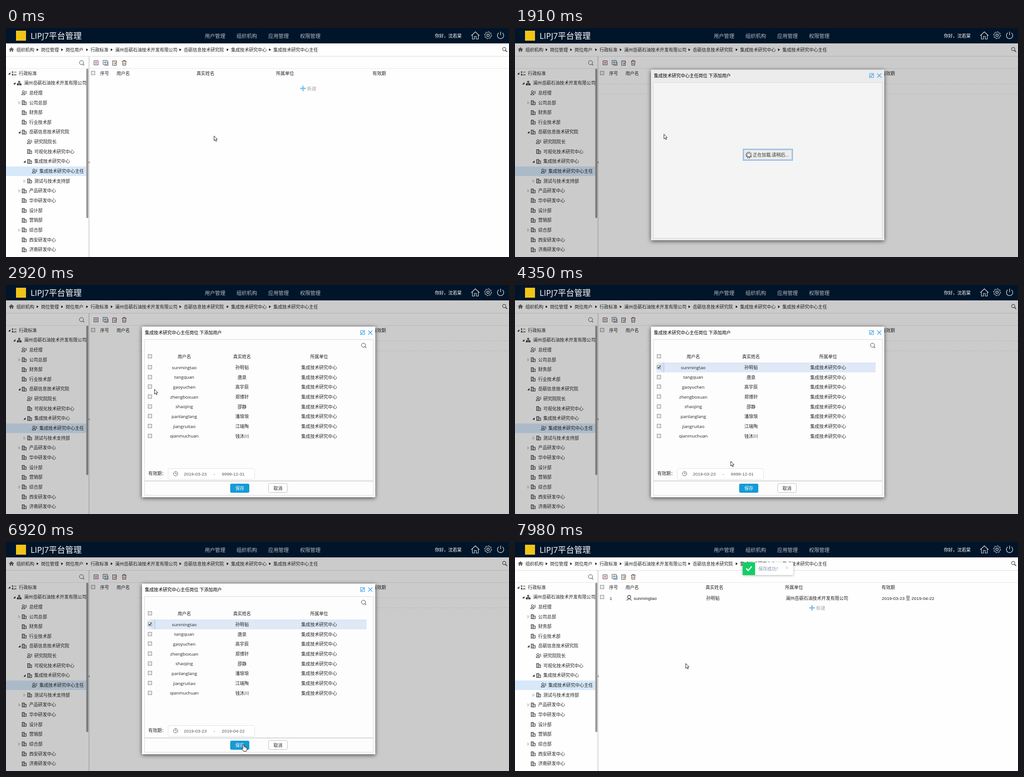
These frames come from a looping animation (1106 by 506 pixels, 8000 ms). An HTML page with a canvas:

```html
<!DOCTYPE html>
<html lang="zh-CN">
<head>
<meta charset="utf-8">
<title>平台管理</title>
<style>
html, body { margin: 0; width: 100%; height: 100%; overflow: hidden; background: #fff; }
canvas { display: block; }
</style>
</head>
<body>
<canvas id="stage" width="1106" height="506"></canvas>
<script>
const g = document.getElementById('stage').getContext('2d');
const LOOP = 8000, INK = '#222', BLUE = '#409eff';
const UI = '"Open Sans","Noto Sans CJK SC","Noto Sans CJK",sans-serif';
const ARIAL = '"Liberation Sans","Noto Sans CJK SC","Noto Sans CJK",sans-serif';

const COMPANY = '澜州岳砺石油技术开发有限公司';
const INSTITUTE = '岳砺信息技术研究院';
const CENTER = '集成技术研究中心';
const USERS = [
  ['sunmingtao', '孙明韬'], ['tangquan', '唐泉'], ['gaoyuchen', '高宇辰'],
  ['zhengboxuan', '郑博轩'], ['shaojing', '邵静'], ['panlanglang', '潘琅琅'],
  ['jiangruitao', '江瑞陶'], ['qianmuchuan', '钱沐川']
];

// depth, arrow (o open, c closed), icon, label
const TREE = [
  [0, 'o', 'list', '行政标准'], [1, 'o', 'org', COMPANY], [2, '', 'user', '总经理'],
  [2, 'c', 'dept', '公司总部'], [2, '', 'dept', '财务部'], [2, '', 'dept', '行业技术部'],
  [2, 'o', 'dept', INSTITUTE], [3, '', 'user', '研究院院长'],
  [3, '', 'dept', '可视化技术研究中心'], [3, 'o', 'dept', CENTER],
  [4, '', 'user', CENTER + '主任'], [3, 'c', 'dept', '测试与技术支持部'],
  [2, 'c', 'dept', '产品研发中心'], [2, '', 'dept', '华中研发中心'], [2, '', 'dept', '设计部'],
  [2, '', 'dept', '营销部'], [2, 'c', 'dept', '综合部'], [2, '', 'dept', '西安研发中心'],
  [2, '', 'dept', '济南研发中心']
];
const CRUMBS = [[23, '组织机构'], [77, '岗位管理'], [131, '岗位用户'], [186, '行政标准'],
  [240, COMPANY], [391, INSTITUTE], [495, CENTER], [588, CENTER + '主任']];

// time, x, y of the pointer
const PATH = [
  [60, 457, 238], [200, 405, 222], [400, 310, 196], [560, 288, 190], [1300, 288, 190],
  [1360, 295, 198], [1540, 327, 234], [2880, 327, 234], [3250, 318, 196], [3450, 316, 183],
  [3600, 318, 183], [3690, 331, 186], [3960, 331, 186], [4350, 474, 389], [4770, 499, 430],
  [4800, 499, 430], [5070, 497, 418], [5310, 497, 418], [5430, 432, 376], [5700, 388, 255],
  [6030, 376, 225], [6100, 376, 225], [6400, 475, 385], [6680, 521, 447], [7230, 521, 447],
  [7500, 460, 370], [7980, 375, 268]
];

function rect(x, y, w, h, c) { g.fillStyle = c; g.fillRect(x, y, w, h); }
function box(x, y, w, h, c) { g.strokeStyle = c; g.lineWidth = 1; g.strokeRect(x + .5, y + .5, w - 1, h - 1); }
function round(x, y, w, h, r, fill, stroke) {
  g.beginPath(); g.roundRect(x, y, w, h, r);
  if (fill) { g.fillStyle = fill; g.fill(); }
  if (stroke) { g.strokeStyle = stroke; g.lineWidth = 1; g.stroke(); }
}
function trace(pts) {
  g.beginPath();
  for (let i = 0; i < pts.length; i += 2) g.lineTo(pts[i], pts[i + 1]);
}
function line(pts, c, w = 1) { trace(pts); g.strokeStyle = c; g.lineWidth = w; g.stroke(); }
function poly(pts, fill, stroke) {
  trace(pts); g.closePath();
  if (fill) { g.fillStyle = fill; g.fill(); }
  if (stroke) { g.strokeStyle = stroke; g.lineWidth = 1; g.stroke(); }
}
function ring(x, y, r, c, w = 1, a = 0, b = Math.PI * 2) {
  g.beginPath(); g.arc(x, y, r, a, b); g.strokeStyle = c; g.lineWidth = w; g.stroke();
}
function text(s, x, y, c = INK, size = 9.8, align = 'left', font = UI, weight = 400) {
  g.font = `${weight} ${size}px ${font}`;
  g.textAlign = align; g.fillStyle = c;
  g.fillText(s, x, y + size * .37);
}
function shadowed(blur, dx, dy, c, draw) {
  g.save();
  g.shadowBlur = blur; g.shadowOffsetX = dx; g.shadowOffsetY = dy; g.shadowColor = c;
  draw();
  g.restore();
}
function at(x, y, draw) { g.save(); g.translate(x, y); draw(); g.restore(); }

function checkbox(x, y, on) {
  rect(x, y, 9, 9, '#e9e9e9'); box(x, y, 9, 9, '#8d8d8d');
  if (on) line([x + 2, y + 4.5, x + 4, y + 6.7, x + 7.2, y + 2], '#222', 1.4);
}
function lens(x, y, r, c = '#444', w = 1) {
  ring(x, y, r, c, w);
  line([x + r * .7, y + r * .7, x + r * 1.35, y + r * 1.35], c, w + .2);
}
function plusBox(x, y, c, p = c) {
  box(x - 5, y - 5, 10, 10, c);
  line([x - 3, y, x + 3, y], p); line([x, y - 3, x, y + 3], p);
}
function stackBox(x, y, c) {
  plusBox(x - 1, y - 1, c);
  line([x + 5.5, y - 3, x + 5.5, y + 5.5, x - 3, y + 5.5], c);
}
function trash(x, y, c) {
  line([x - 5, y - 3.5, x + 5, y - 3.5], c);
  line([x - 2, y - 4, x - 2, y - 5.5, x + 2, y - 5.5, x + 2, y - 4], c);
  line([x - 3.8, y - 3, x - 3.3, y + 5.3, x + 3.3, y + 5.3, x + 3.8, y - 3], c);
  line([x - 1.3, y - 1, x - 1.3, y + 3.5], c, .8); line([x + 1.3, y - 1, x + 1.3, y + 3.5], c, .8);
}

const ICONS = {
  list() {
    for (const y of [-3, 2]) {
      box(-5, y - 1, 3, 3, '#333');
      line([0, y + .5, 5, y + .5], '#333');
    }
    line([-5, 4.5, 5, 4.5], '#333', .7);
  },
  org() {
    box(-2, -5, 4, 3, INK); line([0, -2, 0, 0], INK);
    line([-3.5, 2, -3.5, 0, 3.5, 0, 3.5, 2], INK); line([0, 0, 0, 2], INK);
    for (const x of [-5, -1.5, 2]) box(x, 1.5, 3, 3, INK);
  },
  dept() {
    box(-5, -5, 6, 10, INK);
    line([1, -1.5, 4.5, -1.5, 4.5, 4.5, -5, 4.5], INK);
    for (const y of [-2.5, 0, 2.5]) line([-3.3, y, -.8, y], INK);
    line([2, 1, 3.4, 1], INK, .8);
  },
  user() {
    ring(-1.8, -2, 2.4, INK);
    ring(-1.8, 4.6, 3.7, INK, 1, Math.PI, 0);
    line([-5.5, 4.5, 2, 4.5], INK);
    for (const y of [-3, -.8, 1.4]) line([2.2, y, 5.5, y], INK, .9);
  }
};

function header() {
  rect(0, 0, 1106, 34, '#001529');
  rect(22, 6, 22, 22, '#f0c419');
  text('LIPJ7平台管理', 54, 17, '#fff', 18);
  ['用户管理', '组织机构', '应用管理', '权限管理'].forEach((s, i) =>
    text(s, 437 + i * 69.8, 17.5, '#b5bcc4', 11.3));
  text('你好，沈若棠', 943, 17.5, '#fff');
  const c = '#d8dce0';
  line([1023, 17, 1032, 8.5, 1041, 17], c, 1.3);
  line([1025.5, 15, 1025.5, 24.5, 1030, 24.5, 1030, 18.5, 1034, 18.5, 1034, 24.5, 1038.5, 24.5, 1038.5, 15], c, 1.2);
  ring(1060, 16, 2.7, c, 1.2);
  const gear = [];
  for (let i = 0; i < 32; i++) {
    const a = (i + .5) * Math.PI / 16, r = i % 4 < 2 ? 8 : 6;
    gear.push(1060 + r * Math.cos(a), 16 + r * Math.sin(a));
  }
  poly(gear, null, c);
  ring(1087.5, 16.5, 7, c, 1.3, -Math.PI * .3, Math.PI * 1.3);
  line([1087.5, 8, 1087.5, 16], c, 1.3);
}

function page(t, modal, saved) {
  rect(0, 34, 1106, 472, '#fefefe');
  rect(0, 62, 1106, 1, '#dcdcdc');
  rect(0, 89, 1106, 1, '#e6e6e6');
  line([7, 48, 12, 43.5, 17, 48], '#333', 1.3);
  poly([8.5, 48, 12, 45, 15.5, 48, 15.5, 52.5, 13, 52.5, 13, 49.5, 11, 49.5, 11, 52.5, 8.5, 52.5], '#555');
  CRUMBS.forEach(([x, s], i) => {
    text(s, x, 48);
    if (i) poly([x - 9.5, 45, x - 5.5, 48, x - 9.5, 51], '#111');
  });
  lens(1095.5, 46.5, 3.6, '#444', 1.2);
  line([1098, 49, 1102, 53], '#444', 1.6);
  lens(166, 76.5, 4.5);

  rect(0, 306, 177, 21, '#d6e8fa');
  TREE.forEach(([d, arrow, icon, s], i) => {
    const y = 100 + i * 21.64, x = d * 11.2;
    if (arrow == 'o') poly([x + 9.5, y - 2, x + 9.5, y + 2.8, x + 4.7, y + 2.8], '#222');
    if (arrow == 'c') poly([x + 5.5, y - 2.6, x + 9, y + .3, x + 5.5, y + 3.2], null, '#aaa');
    at(Math.round(x + 18), Math.round(y), ICONS[icon]);
    text(s, x + 28.6, y);
  });
  rect(181, 63, 3, 443, '#e2e2e2');
  round(176.5, 90, 4.5, 330, 2, '#999');
  poly([183.7, 294.5, 181.3, 296.8, 183.7, 299], '#666');

  plusBox(198, 77, '#4a3558', '#b03048');
  stackBox(219, 77, '#345870');
  box(234, 72, 9, 11, '#444');
  line([236, 75, 241, 75], '#555', .8); line([236, 78, 239, 78], '#555', .8);
  line([238.5, 80.5, 244, 74.5], '#a9772d', 1.8);
  trash(260, 77, '#5a3038');

  checkbox(187, 95);
  [[207, '序号'], [243, '用户名'], [419, '真实姓名'], [594, '所属单位'], [806, '有效期']]
    .forEach(([x, s]) => text(s, x, 100));
  if (saved) {
    checkbox(187, 117);
    text('1', 208, 124.5, INK, 9.8, 'left', ARIAL);
    ring(251, 121.5, 3.4, INK, 1.1);
    ring(251, 131, 5.3, INK, 1.1, Math.PI * 1.1, Math.PI * 1.9);
    text(USERS[0][0], 261, 124.5, INK, 9.8, 'left', ARIAL);
    text(USERS[0][1], 420.5, 124.5);
    text(COMPANY, 595.5, 124.5);
    text('2019-03-23 至 2019-04-22', 806.5, 124.5, INK, 9.8, 'left', ARIAL);
  }
  if (modal) {
    g.setLineDash([4, 3]);
    const x = t < 2160 ? 184 : 290;
    for (const y of [123.5, 145.5]) line([x, y, 1106, y], '#e2e2e2');
    g.setLineDash([]);
    rect(0, 34, 1106, 472, 'rgba(0,0,0,.2)');
  } else {
    const y = saved ? 145.5 : 133.5;
    rect(647, y - 1.5, 12, 3, '#7cc4f2'); rect(651.5, y - 6, 3, 12, '#7cc4f2');
    text('新建', 662, y + .5, '#aaa', 10.2);
  }
}

function menu(t) {
  shadowed(5, 2, 2, 'rgba(0,0,0,.35)', () => rect(289, 191, 110, 99, '#fff'));
  box(288, 190, 111, 101, '#d0d0d0');
  if (t >= 1420) rect(291, 217, 106, 22, '#f3f3f3');
  const c = '#333';
  stackBox(304, 205, '#777');
  plusBox(304, 228, c);
  stackBox(304, 251, '#666');
  trash(304, 274, c);
  ['查看', '添加本单位用户', '添加更多单位用户', '删除'].forEach((s, i) =>
    text(s, 315, 205.5 + i * 23, INK, 8.5));
  line([390.5, 202.5, 393.5, 205.5, 390.5, 208.5], '#111', 1.3);
}

function loader(t) {
  rect(304, 120, 504, 345, '#f4f4f4'); box(304, 120, 504, 345, '#d8d8d8');
  rect(501, 267, 110, 26, '#c7dcf5'); box(501, 267, 110, 26, '#6f9fd8');
  rect(503, 269, 106, 22, '#eee'); box(503, 269, 106, 22, '#a9c2de');
  const turn = Math.floor(t / 60);
  for (let i = 0; i < 10; i++) {
    const a = i * Math.PI / 5, k = 40 + (i - turn % 10 + 10) % 10 * 9;
    const cx = Math.cos(a), cy = Math.sin(a);
    line([514 + cx * 3.5, 280.5 + cy * 3.5, 514 + cx * 7.5, 280.5 + cy * 7.5], `rgb(${k},${k},${k})`, 1.7);
  }
  text('正在加载,请稍后...', 523, 280.5, '#333');
}

function userForm(t) {
  box(304, 120, 504, 345, '#d8d8d8');
  lens(786, 133, 4.5);
  checkbox(312, 153);
  [[392, '用户名'], [519, '真实姓名'], [688.5, '所属单位']].forEach(([x, s]) =>
    text(s, x, 158.5, INK, 9.8, 'center'));
  const picked = t >= 3600;
  if (picked) {
    rect(309, 171, 484, 22, '#dfe8f6');
    const grad = g.createLinearGradient(309, 0, 328, 0);
    grad.addColorStop(0, '#f1f6fd'); grad.addColorStop(1, '#cfdef3');
    rect(309, 171, 18, 22, grad);
    if (t >= 3750) rect(327, 171, 1, 22, '#a9c3ea');
  }
  USERS.forEach(([id, name], i) => {
    const y = 182 + i * 21.65;
    checkbox(312, Math.round(y) - 5, picked && !i);
    text(id, 392, y, INK, 9.8, 'center');
    text(name, 519, y + .5, INK, 9.8, 'center');
    text(CENTER, 688.5, y + .5, INK, 9.8, 'center');
  });
  text('有效期：', 313, 416.5);
  round(356.5, 405.5, 190, 24, 3, '#fff', '#dfe2e8');
  ring(373, 417, 4.7, '#555');
  line([373, 414, 373, 417.3, 375.5, 417.3], '#555');
  text('2019-03-23', 391, 417.5, '#555', 9.8, 'left', ARIAL);
  text('-', 456.5, 417.5, '#555', 9.8, 'left', ARIAL);
  text(t < 6150 ? '9999-12-31' : '2019-04-22', 474.5, 417.5, '#555', 9.8, 'left', ARIAL);
  if (t >= 5250 && t < 6150) rect(496, 412, 1, 11, '#222');
  rect(304, 432, 504, 2, '#d6d6d6');
  round(493, 439, 42, 20, 3, '#169bd5');
  text('保存', 514, 449, '#fff', 9.8, 'center', UI, 500);
  round(577.5, 438.5, 41, 20, 3, '#fff', '#bbb');
  text('取消', 598, 449, INK, 9.8, 'center');
}

function dialog(t) {
  const loading = t < 2160;
  shadowed(9, 0, 2, 'rgba(0,0,0,.65)', () => rect(299, 92, 513, 377, loading ? '#ececec' : '#fdfdfd'));
  text(CENTER + '主任岗位 下添加用户', 305.5, 105.5, '#000', 9.8, 'left', UI, 500);
  const c = '#3a9fe8';
  box(779, 100, 10, 10, c);
  line([781.5, 107.5, 786.5, 102.5], c);
  line([783.5, 102.5, 786.5, 102.5, 786.5, 105.5], c); line([781.5, 104.5, 781.5, 107.5, 784.5, 107.5], c);
  line([796.5, 100.5, 805.5, 109.5], c, 1.3); line([805.5, 100.5, 796.5, 109.5], c, 1.3);
  loading ? loader(t) : userForm(t);
}

function chevrons(x, dir, n) {
  for (let i = 0; i < n; i++) {
    const cx = x + (i - (n - 1) / 2) * 4.5;
    line([cx + 2 * dir, 199, cx - 2 * dir, 203, cx + 2 * dir, 207], '#444');
  }
}
// One month: day before the 1st, blank lead days, month length
function month(x0, label, labelX, prevLast, lead, days) {
  text(label, labelX, 203.5, '#555', 11.4, 'center', ARIAL);
  [...'日一二三四五六'].forEach((s, i) => text(s, x0 - 4.7 + i * 24.45, 228.5, '#555', 9, 'center'));
  const april = days == 30;
  rect(x0 - 12, 242, 171, 1, '#ebeef5');
  for (let i = 0; i < 42; i++) {
    const x = x0 + i % 7 * 24.5, y = 253.5 + Math.floor(i / 7) * 20.9;
    const d = i - lead + 1, inside = d > 0 && d <= days;
    if (inside && (april || d > 23)) rect(x - 12.25, y - 10.5, 24.5, 21, '#f2f6fc');
    const today = !april && d == 23;
    if (today) { g.beginPath(); g.arc(x, y - .5, 8.6, 0, 7); g.fillStyle = BLUE; g.fill(); }
    const c = today ? '#fff' : inside ? '#444' : april && i == 41 ? '#7dbcf5' : '#c0c4cc';
    text(d < 1 ? prevLast + d : inside ? d : d - days, x, y, c, 8.7, 'center', ARIAL, today ? 700 : 400);
  }
}
function calendar() {
  shadowed(6, 0, 1, 'rgba(0,0,0,.2)', () => round(356.5, 186, 443, 219.5, 2, '#fff'));
  round(356.5, 186, 443, 219.5, 2, null, '#dfe2e8');
  ['一周', '一个月', '三个月', '一年'].forEach((s, i) => text(s, 362, 201.5 + i * 20.9, '#555', 10));
  text('长期有效', 362, 339, '#555', 10);
  text('无效', 362, 360, '#555', 10);
  month(447, '2019 年  3 月', 518, 28, 5, 31);
  month(632.5, '2019 年  4 月', 699.5, 31, 1, 30);
  rect(427, 186, 1, 190, '#e4e7ed'); rect(613, 186, 1, 190, '#e4e7ed');
  rect(357, 376, 443, 1, '#e0e3e8');
  chevrons(445.5, 1, 2); chevrons(466, 1, 1); chevrons(750.5, -1, 1); chevrons(771.5, -1, 2);
  text('清空', 732.5, 389, BLUE, 8.6);
  round(757.5, 379.5, 38, 19, 2, '#fff', '#dcdfe6');
  text('确定', 776.5, 389, '#444', 8.6, 'center');
}

function toast(t) {
  g.save();
  g.globalAlpha = Math.min(1, (t - 7480) / 240);
  shadowed(5, 0, 1, 'rgba(0,0,0,.3)', () => round(500.5, 45, 111.5, 28, 2, '#fff'));
  rect(500.5, 45, 27.5, 28, '#13ce66');
  line([508.5, 58.5, 512.8, 63, 520.5, 54], '#fff', 2.6);
  text('保存成功！', 535, 59, '#8492a6');
  line([595, 54, 601, 60], '#c0ccda'); line([601, 54, 595, 60], '#c0ccda');
  g.restore();
}

function pointer(t) {
  let x = PATH[0][1], y = PATH[0][2];
  for (let i = 1; i < PATH.length; i++) {
    const [t0, x0, y0] = PATH[i - 1], [t1, x1, y1] = PATH[i];
    if (t < t0) break;
    const k = Math.min(1, (t - t0) / (t1 - t0));
    x = x0 + (x1 - x0) * k; y = y0 + (y1 - y0) * k;
  }
  at(Math.round(x), Math.round(y), () => {
    if (t >= 4900 && t < 5370) {
      line([-2, -6.5, 3, -6.5], '#222'); line([.5, -6, .5, 7], '#222'); line([-2, 7.5, 3, 7.5], '#222');
    } else if (t >= 6600 && t < 7260) {
      poly([0, .5, 1.5, 0, 2.5, 1, 2.5, 5, 5, 5, 7, 6, 9, 7, 9, 11, 7.5, 15.5, 1.5, 15.5,
        -1, 11.5, -3, 8.5, -2, 7.5, 0, 9.5], '#fff', '#111');
      line([4.5, 6, 4.5, 8.5], '#111', .8); line([6.7, 6.5, 6.7, 8.8], '#111', .8);
    } else {
      poly([.5, .5, .5, 11, 2.8, 8.8, 4.5, 12.6, 6.2, 11.9, 4.6, 8.1, 7.8, 8.1], '#fff', '#222');
    }
  });
}

function draw(t) {
  const modal = t >= 1910 && t < 7230;
  page(t, modal, t >= 7420);
  header();
  if (t >= 930 && t < 1910) menu(t);
  if (modal) dialog(t);
  if (t >= 5310 && t < 6150) calendar();
  if (t >= 7480) toast(t);
  pointer(t);
}

const start = performance.now();
function tick() {
  draw((performance.now() - start) % LOOP);
  requestAnimationFrame(tick);
}
tick();
</script>
</body>
</html>
```
